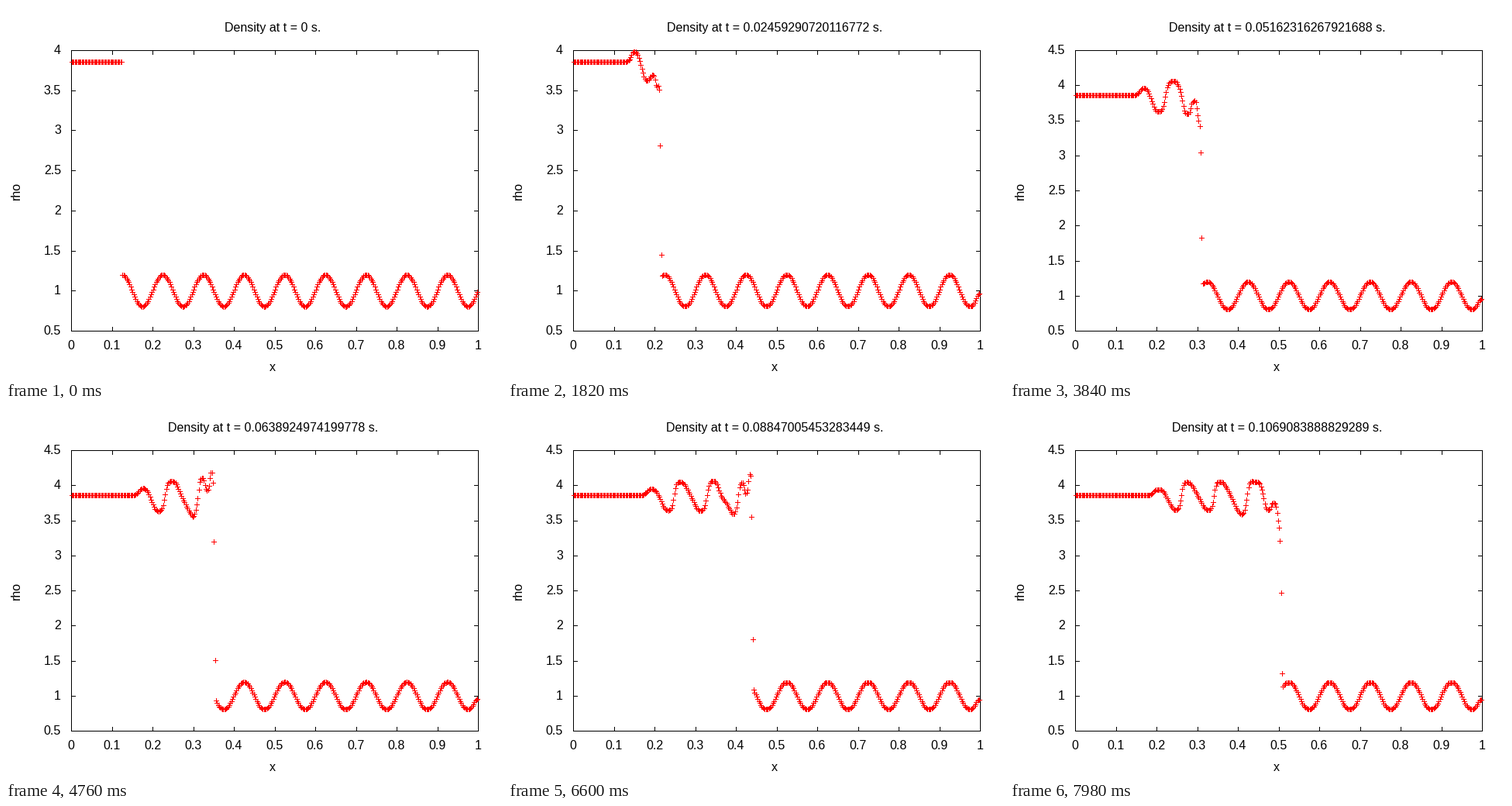
Recreate the animation shown at these times as a matplotlib script. Size 640 by 480 pixels, loop 8 s.

```python
import matplotlib.pyplot as plt
import numpy as np
from matplotlib.animation import FuncAnimation
from matplotlib.markers import MarkerStyle

W, H = 640, 480
LEFT, RIGHT, TOP, BOTTOM = 84, 609, 57, 419
FRAMES, CELLS, GAMMA = 400, 400, 1.4
DX = 1 / CELLS

# Simulated time reached after a number of steps, one step per frame
STEPS = [0, 91, 134, 192, 284, 330, 399]
CLOCK = [0, 0.02459290720116772, 0.03609723017394504, 0.05162316267921688,
         0.0761618321607387, 0.08847005453283449, 0.1069083888829289]

plt.rcParams.update({"font.family": "Liberation Sans", "font.size": 16})


# Shock running into a sinusoidal density field (1D Euler equations)
def flux(q):
    rho, m, e = q
    u = m / rho
    p = (GAMMA - 1) * (e - 0.5 * m * u)
    return np.array([m, m * u + p, u * (e + p)]), abs(u) + np.sqrt(GAMMA * p / rho)


def van_leer(a, b):
    ab = a * b
    return np.where(ab > 0, 2 * ab / np.where(ab > 0, a + b, 1), 0)


def rate(q):
    w = np.pad(q, ((0, 0), (2, 2)), mode="edge")
    d = np.diff(w)
    half = van_leer(d[:, :-1], d[:, 1:]) / 2
    mid = w[:, 1:-1]
    ql, qr = (mid + half)[:, :-1], (mid - half)[:, 1:]
    fl, al = flux(ql)
    fr, ar = flux(qr)
    f = 0.5 * (fl + fr - np.maximum(al, ar) * (qr - ql))
    return -np.diff(f) / DX


def solve(x, times):
    behind = x < 0.125
    rho = np.where(behind, 3.857143, 1 + 0.2 * np.sin(20 * np.pi * x))
    u = np.where(behind, 2.629369, 0)
    p = np.where(behind, 10.33333, 1)
    q = np.array([rho, rho * u, p / (GAMMA - 1) + 0.5 * rho * u * u])
    states = [q[0]]
    for dt in np.diff(times):
        q1 = q + dt * rate(q)
        q = 0.5 * (q + q1 + dt * rate(q1))
        states.append(q[0])
    return states


x = (np.arange(CELLS) + 0.5) * DX
times = np.interp(range(FRAMES), STEPS, CLOCK).tolist()
states = solve(x, times)

fig = plt.figure(figsize=(W / 72, H / 72), dpi=72, facecolor="white")
ax = fig.add_axes([0, 0, 1, 1])
ax.set(xlim=(0, W), ylim=(H, 0))
ax.axis("off")


def line(xs, ys):
    return ax.plot(xs, ys, color="black", lw=1, antialiased=False, zorder=1)[0]


def to_x(v):
    return LEFT + (RIGHT - LEFT) * v


def to_y(v, high):
    return BOTTOM - (BOTTOM - TOP) * (v - 0.5) / (high - 0.5)


line([LEFT, RIGHT, RIGHT, LEFT, LEFT], [TOP, TOP, BOTTOM, BOTTOM, TOP])
for k in range(11):
    px = to_x(k / 10)
    line([px, px], [BOTTOM, BOTTOM - 5])
    line([px, px], [TOP, TOP + 5])
    ax.text(px, 443, f"{k / 10:g}", ha="center")

y_ticks = []
for k in range(1, 10):
    parts = (line([LEFT, LEFT + 5], [0, 0]), line([RIGHT, RIGHT - 5], [0, 0]),
             ax.text(71, 0, f"{k / 2:g}", ha="right"))
    y_ticks.append((k / 2, parts))

ax.text(343.5, 471, "x", ha="center")
ax.text(13.5, 238, "rho", ha="center", va="center", rotation=90)
title = ax.text(344.5, 33, "", ha="center")
plus = MarkerStyle("+", capstyle="projecting")
dots, = ax.plot([], [], ls="", marker=plus, color="red", ms=6, mew=1,
                antialiased=False, zorder=3)


def draw(n):
    rho = states[n]
    high = max(4, np.ceil(rho.max() * 2) / 2)
    for v, (a, b, label) in y_ticks:
        py = to_y(v, high)
        a.set_ydata([py, py])
        b.set_ydata([py, py])
        label.set_y(py + 5)
        for part in (a, b, label):
            part.set_visible(v <= high)
    dots.set_data(to_x(x), to_y(rho, high))
    title.set_text(f"Density at t = {times[n] or 0} s.")
    return []


anim = FuncAnimation(fig, draw, frames=FRAMES, interval=20, repeat=True)
plt.show()
```
